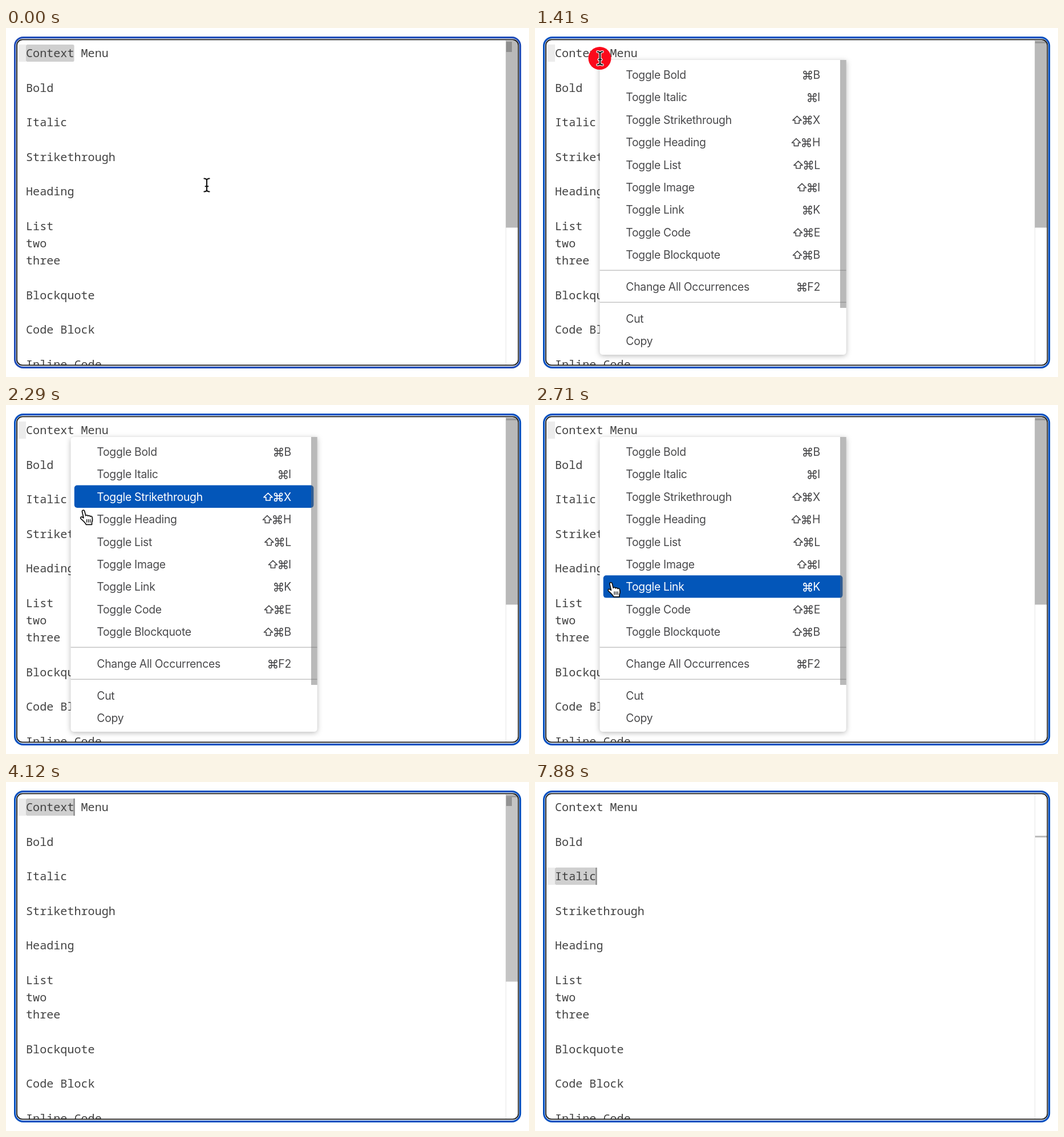
An HTML page for the animation above (8 s loop, 917 by 611 pixels).

```html
<!DOCTYPE html>
<html lang="en">
<head>
<meta charset="utf-8">
<title>Editor context menu</title>
<style>
html, body { margin: 0; width: 100%; height: 100%; overflow: hidden; background: #fff; }
svg { display: block; width: 100vw; height: 100vh; }
.code { font: 20.13px "Noto Sans Mono", monospace; fill: #424242; white-space: pre; }
.item { font: 19.4px Inter, sans-serif; letter-spacing: -.3px; fill: #4a4a4c; color: #4a4a4c; }
.item path { fill: none; stroke: currentColor; stroke-width: 1.6; stroke-linejoin: round; }
.item.on { fill: #fff; color: #fff; }
.thumb { fill: #646464; fill-opacity: .45; }
#panel { filter: drop-shadow(0 2px 5px rgba(0, 0, 0, .27)); }
</style>
</head>
<body>
<svg viewBox="0 0 917 611" xmlns="http://www.w3.org/2000/svg">
  <defs>
    <clipPath id="inside"><rect x="19.5" y="21" width="878.5" height="569" rx="9"/></clipPath>
  </defs>
  <rect width="917" height="611" fill="#fff"/>
  <rect id="ring" x="15.6" y="16.6" width="886" height="577.8" rx="14.5" fill="none" stroke-width="3.2"/>
  <g clip-path="url(#inside)">
    <rect id="current" x="20.5" height="30.2" fill="#ececec"/>
    <rect id="selection" height="30.2" rx="2.5" fill="#cfcfcf"/>
    <g id="lines"></g>
    <rect id="caret" width="2.6" height="30.2" fill="#929292"/>
    <path d="M876.5 21V590" stroke="#e6e6e6"/>
    <rect id="mark" x="877" width="10" height="18" fill="#b0b0b0"/>
    <rect id="rulerLine" x="877" width="21" height="3" fill="#bbb"/>
    <rect id="thumb" class="thumb" x="876.5" y="22" width="21" height="327.5"/>
  </g>
  <rect x="19" y="20.4" width="879.4" height="570" rx="10" fill="none" stroke="#161616" stroke-width="1.8"/>
  <g id="menu">
    <path id="panel" fill="#fff" d="M119.5 56H545.7V566q0 6-6 6H119.5q-6 0-6-6V62q0-6 6-6Z"/>
    <rect id="hover" x="119.8" width="419.6" height="39.4" rx="5" fill="#0356b9"/>
    <path d="M113.5 424.3H545.7M113.5 480.3H545.7" stroke="#c6c6c6" stroke-width="1.4"/>
    <g id="items"></g>
    <rect class="thumb" x="535" y="56" width="10.7" height="434"/>
  </g>
  <circle id="press" cx="113.5" cy="53" r="20" fill="#fb0a1c"/>
  <g id="beam" fill="none" stroke-linecap="round">
    <path id="beamEdge" stroke="#fff" stroke-width="4.4"/>
    <path id="beamInk" stroke="#111" stroke-width="2.1"/>
  </g>
  <g id="hand" stroke="#111" stroke-width="1.7" stroke-linejoin="round" stroke-linecap="round">
    <path fill="#fff" d="M-2.5 2C-3-1 1-1.5 1.8 1.2L3.8 9C4.5 7.5 7 7.5 7.6 9.5C8.5 8.2 11 8.5 11.5 10.3C12.5 9.2 15 9.8 15.2 12C16 16 15.8 18 14.5 20.5V24.5H4.5C3 21-1 17.5-4.5 14.5C-6.5 12.5-4.5 10-2 11.5L0 13Z"/>
    <path fill="none" stroke-width="1.3" d="M5.6 15.5V20.5M8.6 15.5V20.5M11.6 15.5V20.5"/>
  </g>
</svg>
<script>
const NS = "http://www.w3.org/2000/svg";
const LOOP = 8000, CHAR = 12.08, LINE = 30.24, LEFT = 35, ROW = 39.4, ROWS_TOP = 62.3;
const $ = id => document.getElementById(id);

function add(parent, tag, attrs, text) {
  const el = document.createElementNS(NS, tag);
  set(el, attrs);
  if (text) el.textContent = text;
  parent.appendChild(el);
  return el;
}
function set(el, attrs) {
  for (const k in attrs) el.setAttribute(k, attrs[k]);
}
const show = (el, on) => { el.style.display = on ? "" : "none"; };
const lineTop = n => 28.9 + LINE * (n - 1);
const within = (t, a, b) => t >= a && t < b;

// Document text; empty strings are blank lines.
const doc = ["Context Menu", "", "Bold", "", "Italic", "", "Strikethrough", "", "Heading", "",
  "List", "two", "three", "", "Blockquote", "", "Code Block", "", "Inline Code"];
const lines = doc.map((s, i) =>
  add($("lines"), "text", { class: "code", x: LEFT, y: 51.2 + LINE * i }, s));

// Menu rows: label, key, centre of the command sign, shift flag.
const COMMAND = "M-2.4-4.7a2.3 2.3 0 1 0-2.3 2.3H4.7a2.3 2.3 0 1 0-2.3-2.3V4.7a2.3 2.3 0 1 0 2.3-2.3H-4.7a2.3 2.3 0 1 0 2.3 2.3Z";
const SHIFT = "M0-6.6L7.6.8H3.7V6.2H-3.7V.8H-7.6Z";
const entries = [
  ["Bold", "B", 478], ["Italic", "I", 486], ["Strikethrough", "X", 477.5, 1],
  ["Heading", "H", 476, 1], ["List", "L", 479.5, 1], ["Image", "I", 486, 1],
  ["Link", "K", 478], ["Code", "E", 479, 1], ["Blockquote", "B", 478, 1]
];
function addItem(label, y, key, cx, shift) {
  const g = add($("items"), "g", { class: "item" });
  add(g, "text", { x: 159.3, y: y + 7 }, label);
  if (key) {
    add(g, "text", { x: 500, y: y + 7, "text-anchor": "end" }, key);
    add(g, "path", { d: COMMAND, transform: `translate(${cx} ${y + .5})` });
  }
  if (shift) add(g, "path", { d: SHIFT, transform: `translate(${cx - 18} ${y})` });
  return g;
}
const rows = entries.map(([name, key, cx, shift], i) =>
  addItem("Toggle " + name, 82 + ROW * i, key, cx, shift));
addItem("Change All Occurrences", 453, "F2", 468);
addItem("Cut", 508.7);
addItem("Copy", 548.2);

const BEAM = "M-4.6-11.5Q-.6-11.5 0-8.8Q.6-11.5 4.6-11.5M0-8.8V8.8M-4.6 11.5Q-.6 11.5 0 8.8Q.6 11.5 4.6 11.5M-2.4 2.2H2.4";
set($("beamEdge"), { d: BEAM });
set($("beamInk"), { d: BEAM });

// Editor states: start, line, selection start and end, ruler mark, replaced text.
const states = [
  [0, 1, 0, 7, 1], [1060, 1, 0, 0, 1], [1180, 1, 0, 0, 0], [3760, 1, 0, 7, 1],
  [4530, 1, 0, 0], [4650, 2, 0, 0], [4820, 3, 0, 0],
  [5180, 3, 0, 4, 1], [5350, 3, 2, 6, 0, "**Bold**"], [6000, 3, 0, 4],
  [6470, 3, 0, 0], [6560, 4, 0, 0], [6650, 5, 0, 0],
  [6940, 5, 0, 6, 1], [7180, 5, 1, 7, 1, "_Italic_"], [7240, 5, 1, 7, 0, "_Italic_"],
  [7880, 5, 0, 6]
];
const caretOff = [[0, 350], [850, 3760], [4240, 4530], [5820, 6000], [7760, 7880]];

// Pointer path: time, x, y.
const path = [[350, 352, 275], [1060, 114, 53], [1500, 114, 53], [1940, 134, 128],
  [2290, 136, 184.5], [2710, 133.5, 311], [2760, 133, 327], [3240, 134, 386]];
function pointer(t) {
  if (t <= path[0][0]) return path[0].slice(1);
  const i = path.findIndex(p => p[0] > t);
  if (i < 0) return path[path.length - 1].slice(1);
  const [t0, x0, y0] = path[i - 1], [t1, x1, y1] = path[i];
  let u = (t - t0) / (t1 - t0);
  if (i === 1) u = u * u * (3 - 2 * u);
  return [x0 + (x1 - x0) * u, y0 + (y1 - y0) * u];
}

function drawEditor(t) {
  const [, line, from, to, mark, text] = states.filter(s => s[0] <= t).pop();
  const y = lineTop(line), typing = t >= 4530;
  const empty = from === to;
  set($("ring"), { stroke: t < 60 ? "#1f4cb8" : "#0450c0" });
  set($("current"), { y, width: typing && empty ? 856 : 14.5 });
  show($("selection"), !empty);
  set($("selection"), { x: LEFT + from * CHAR, y, width: (to - from) * CHAR });
  show($("caret"), !caretOff.some(([a, b]) => within(t, a, b)));
  set($("caret"), { x: LEFT + to * CHAR - (to ? 1.3 : 0), y });
  show($("mark"), mark);
  set($("mark"), { y: 24 + 17.5 * (line - 1) });
  show($("rulerLine"), t >= 60);
  set($("rulerLine"), { y: 23.7 + 17.6 * (line - 1) });
  set($("thumb"), { opacity: Math.max(0, Math.min(1, (4800 - t) / 800)) });

  lines.forEach((el, i) => {
    const active = i === line - 1 && text;
    const value = active ? text : doc[i];
    if (el.textContent !== value) el.textContent = value;
    el.style.fontWeight = active && line === 3 ? "bold" : "";
    el.style.fontStyle = active && line === 5 ? "italic" : "";
  });
}

function drawMenu(t) {
  const open = within(t, 1180, 3760);
  show($("menu"), open);
  set($("menu"), { opacity: Math.min(1, Math.max(0, (t - 1150) / 90)) });
  const row = t > 1530 ? Math.floor((pointer(t - 30)[1] - ROWS_TOP) / ROW) : -1;
  show($("hover"), row >= 0);
  set($("hover"), { y: ROWS_TOP - .5 + ROW * Math.max(row, 0) });
  rows.forEach((g, i) => g.classList.toggle("on", i === row));
}

function drawPointer(t) {
  const [x, y] = pointer(t), hand = t >= 1530;
  const move = { transform: `translate(${x} ${y})` };
  show($("beam"), !hand);
  show($("hand"), hand && t < 3760);
  set($("beam"), move);
  set($("hand"), move);
  show($("press"), within(t, 1060, 1600));
  set($("press"), { opacity: Math.min(1, (1600 - t) / 120) });
}

function frame(now) {
  const t = now % LOOP;
  drawEditor(t);
  drawMenu(t);
  drawPointer(t);
  requestAnimationFrame(frame);
}
frame(0);
</script>
</body>
</html>
```
